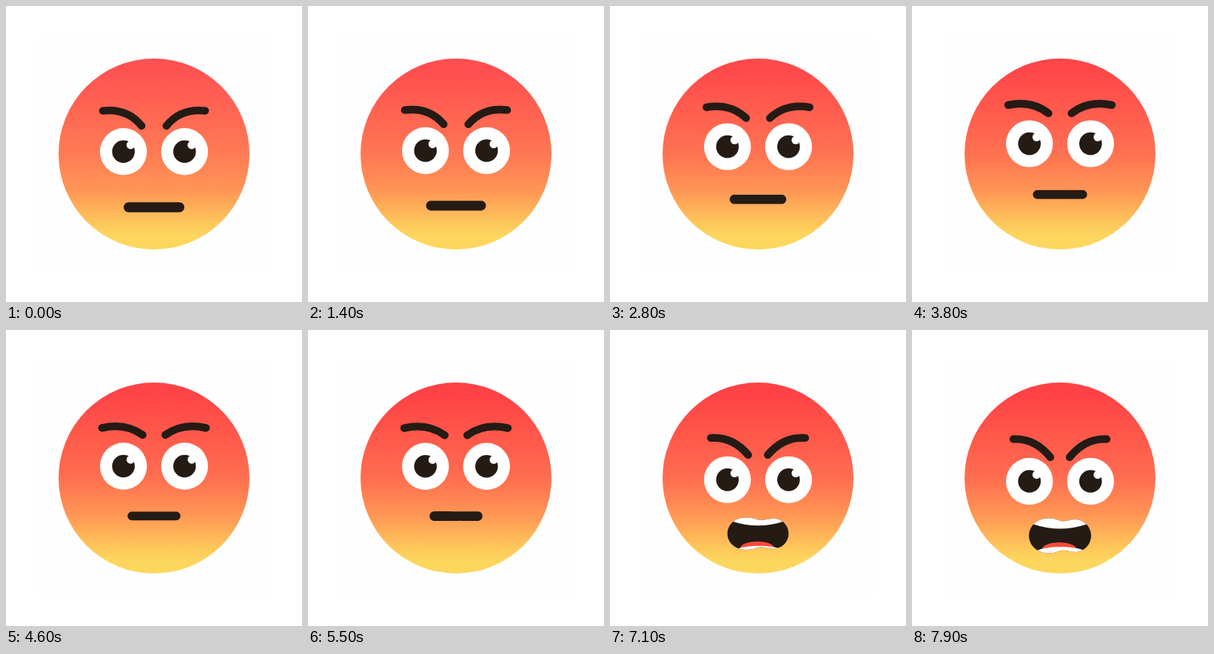
Recreate the animation shown at these times as an HTML page. Size 400 by 400 pixels, loop 8 s.

```html
<!DOCTYPE html>
<html lang="en">
<head>
<meta charset="utf-8">
<title>Angry face</title>
<style>
  html, body { margin: 0; width: 100%; height: 100%; overflow: hidden; background: #fff; }
  svg { display: block; width: 100%; height: 100%; }
</style>
</head>
<body>
<svg viewBox="0 0 400 400">
  <defs>
    <linearGradient id="skin" x1="0" y1="0" x2="0" y2="1">
      <stop id="top" offset=".06"/>
      <stop id="mid" offset=".5"/>
      <stop offset=".69" stop-color="#ff9555"/>
      <stop offset=".86" stop-color="#fdc65a"/>
      <stop offset=".93" stop-color="#fdd65e"/>
    </linearGradient>
    <clipPath id="lips"><path id="lipShape"/></clipPath>
    <g id="eye">
      <circle r="31.7" fill="#fff"/>
      <circle r="15.3" fill="#241b15"/>
      <circle cx="9.7" cy="-8.9" r="5.6" fill="#fff"/>
    </g>
    <path id="brow" fill="none" stroke="#241b15" stroke-width="10.4" stroke-linecap="round"/>
  </defs>
  <rect x="40" y="40" width="320" height="320" fill="#fefefe"/>
  <circle cx="200" cy="200" r="129" fill="url(#skin)"/>
  <use href="#brow"/>
  <use href="#brow" transform="translate(400 0) scale(-1 1)"/>
  <g id="eyes">
    <use href="#eye" x="158.7"/>
    <use href="#eye" x="241.3"/>
  </g>
  <path id="mouth" fill="#241b15"/>
  <g clip-path="url(#lips)">
    <ellipse id="tongue" cx="199" rx="23" ry="9" fill="#fb4a3c"/>
    <path id="upper" fill="#fff"/>
    <path id="lower" fill="#fff"/>
  </g>
</svg>
<script>
  const LOOP = 8000, STEP = 100;
  const $ = id => document.getElementById(id);
  const clamp = v => Math.min(1, Math.max(0, v));
  const mix = (a, b, k) => a + (b - a) * k;
  const ease = (t, from, to) => 0.5 - 0.5 * Math.cos(Math.PI * clamp((t - from) / (to - from)));
  const mixAll = (a, b, k) => a.map((v, i) => mix(v, b[i], k));
  const rgb = c => `rgb(${c.map(Math.round)})`;
  const bell = (x, c, w) => Math.exp(-(((x - c) / w) ** 2));

  // Poses: calm start, raised, shouting.
  // brow: start, control, end; mouth: centre y, half width, half height, wobble
  const poses = [
    { eye: 196.8, brow: [131, 141.6, 164, 138, 183.2, 162], mouth: [272, 41, 6.7, 0] },
    { eye: 183.5, brow: [129.7, 132, 161, 124.5, 184.7, 141], mouth: [250.5, 35.5, 5.8, 0] },
    { eye: 204.5, brow: [137, 147.5, 166, 146, 187, 172], mouth: [278, 42, 22, 2.6] }
  ];

  function mouthPath([cy, w, h, q]) {
    const n = 60, up = [], down = [];
    for (let i = 0; i <= n; i++) {
      const x = -w * Math.cos(Math.PI * i / n);
      const out = Math.max(0, Math.abs(x) - (w - h));
      const edge = Math.sqrt(Math.max(0, h * h - out * out));
      const wave = q * (0.6 * bell(x, -14, 12) - bell(x, 4, 9));
      const px = (200 + x).toFixed(2);
      up.push(`${px} ${(cy - edge - wave).toFixed(2)}`);
      down.unshift(`${px} ${(cy + edge + wave).toFixed(2)}`);
    }
    return `M${up.concat(down).join("L")}Z`;
  }

  function draw(t) {
    const rise = ease(t, 400, 5200), shout = ease(t, 5200, 7600);
    const blend = key => {
      const [a, b, c] = poses.map(p => [].concat(p[key]));
      return mixAll(mixAll(a, b, rise), c, shout);
    };

    $("eyes").setAttribute("transform", `translate(0 ${blend("eye")[0]})`);
    const [x0, y0, cx, cy, x1, y1] = blend("brow");
    $("brow").setAttribute("d", `M${x0} ${y0}Q${cx} ${cy} ${x1} ${y1}`);

    const mouth = blend("mouth"), shape = mouthPath(mouth);
    $("mouth").setAttribute("d", shape);
    $("lipShape").setAttribute("d", shape);

    // Teeth and tongue slide in as the mouth opens.
    const hide = 1 - clamp((shout - 0.45) / 0.55);
    const top = mouth[0] - mouth[2] - 17 * hide;
    const low = mouth[0] + mouth[2] + 18 * hide;
    $("upper").setAttribute("d", `M150 ${top - 12}H250L236 ${top + 6.5}Q200 ${top + 18.5} 164 ${top + 6.5}Z`);
    $("lower").setAttribute("d", `M164 ${low + 1}C176 ${low - 9.5} 224 ${low - 9.5} 236 ${low}V${low + 12}H164Z`);
    $("tongue").setAttribute("cy", low - 4);

    const heat = clamp(t / 5200);
    $("top").setAttribute("stop-color", rgb(mixAll([255, 82, 82], [255, 66, 69], heat)));
    $("mid").setAttribute("stop-color", rgb(mixAll([255, 123, 84], [255, 109, 80], heat)));
  }

  const start = performance.now();
  function tick() {
    const t = (performance.now() - start) % LOOP;
    draw(Math.floor(t / STEP) * STEP);
    requestAnimationFrame(tick);
  }
  tick();
</script>
</body>
</html>
```
